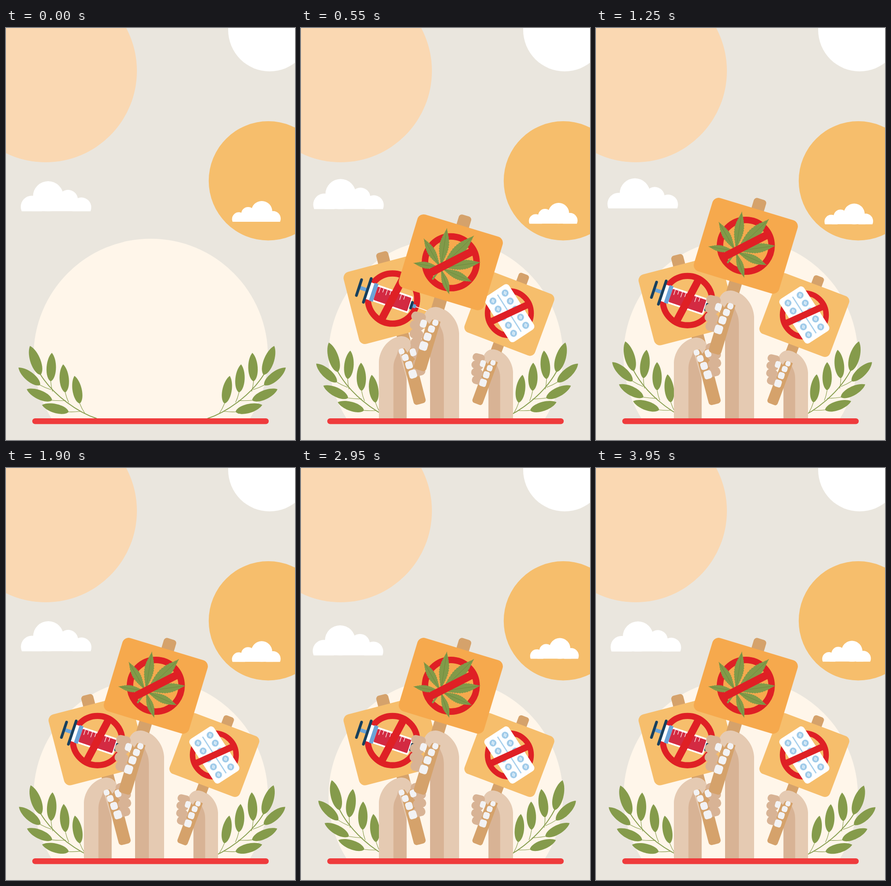
An HTML page for the animation above (4 s loop, 627x893 px).

```html
<!DOCTYPE html>
<html lang="en">
<head>
<meta charset="utf-8">
<title>Raised signs</title>
<style>
html, body { margin: 0; width: 100%; height: 100%; overflow: hidden; background: #eae6de; }
svg { display: block; width: 627px; height: 893px; }
</style>
</head>
<body>
<svg id="stage" viewBox="0 0 627 893" xmlns="http://www.w3.org/2000/svg"></svg>
<script>
const LOOP = 4000, STEP = 50, GROUND = 846;
const GREEN = '#859b4b', RED = '#df2025', SAND = '#f6be6c', WOOD = '#d5a26b';
const LIGHT = '#e5cab2', SKIN = '#d8b395', NAVY = '#17405e', BLUE = '#6ba4d8', PALE = '#a8d0ec';

const circle = (x, y, r, fill) => `<circle cx="${x}" cy="${y}" r="${r}" fill="${fill}"/>`;
const rect = (x, y, w, h, r, fill) =>
  `<rect x="${x}" y="${y}" width="${w}" height="${h}" rx="${r}" fill="${fill}"/>`;
const line = (x1, y1, x2, y2, color, w, cap = 'butt') =>
  `<path d="M${x1} ${y1}L${x2} ${y2}" stroke="${color}" stroke-width="${w}" stroke-linecap="${cap}"/>`;
const path = (d, fill) => `<path d="${d}" fill="${fill}"/>`;
const group = (transform, body, id) =>
  `<g ${id ? `id="${id}" ` : ''}transform="${transform}">${body}</g>`;
const at = (x, y, angle, body) => group(`translate(${x} ${y}) rotate(${angle})`, body);
// Rounded box placed by its centre
const box = (x, y, w, h, r, angle, fill) => at(x, y, angle, rect(-w / 2, -h / 2, w, h, r, fill));
const repeat = (n, make) => Array.from({ length: n }, (_, i) => make(i)).join('');

// Cloud with its lower left corner at the origin
const cloud = `<g clip-path="url(#flat)">` +
  circle(24, -9.8, 24, '#fff') + circle(59.5, -32.3, 33, '#fff') +
  circle(102.5, -25, 21.5, '#fff') + circle(131.5, -8.5, 21.5, '#fff') +
  rect(24, -26, 106, 26, 0, '#fff') + '</g>';

// Leaf from tip to base, with a curved stalk on to the stem
function leaf(tip, base, joint, bend) {
  const dx = base[0] - tip[0], dy = base[1] - tip[1], len = Math.hypot(dx, dy);
  const a = len * .24, b = len * .88, w = len * .22;
  const mid = [(base[0] + joint[0]) / 2 - bend, (base[1] + joint[1]) / 2 + bend];
  return `<path d="M${base}Q${mid} ${joint}" fill="none" stroke="${GREEN}" stroke-width="1.1"/>` +
    at(...tip, Math.atan2(dy, dx) * 180 / Math.PI,
      path(`M0 0C${a} ${w} ${b} ${w} ${len} 0C${b} ${-w} ${a} ${-w} 0 0Z`, GREEN));
}

const branch =
  `<path d="M197 846.500C158 834 104 798 74 750" fill="none" stroke="${GREEN}" stroke-width="1.9"/>` +
  repeat(3, i => leaf([148.5 - 24.5 * i, 754 - 25 * i], [160 - 31.5 * i, 814 - 24 * i],
    [171 - 35 * i, 835 - 23.5 * i], 1)) +
  repeat(3, i => leaf([78 - 40.5 * i + 7.5 * i * i, 817 - 27.5 * i - 6.5 * i * i],
    [136 - 41 * i + 5 * i * i, 832 - 21 * i - 4 * i * i], [161 - 31.5 * i, 831 - 23.5 * i], 1)) +
  leaf([52, 689], [75, 752], [75, 752], 0);

// Saw-edged leaflet growing along the x axis
function leaflet(len) {
  const teeth = 16, up = [], down = [];
  for (let i = 1; i < teeth * 2; i++) {
    const u = i / teeth / 2, tooth = i % 2 ? .8 : -.6;
    const half = len * .115 * Math.sin(Math.PI * u ** 1.15) ** 1.2 + tooth * Math.sin(Math.PI * u);
    up.push(`${u * len} ${half}`);
    down.unshift(`${u * len} ${-half}`);
  }
  return path(`M0 0L${up.join('L')}L${len} 0L${down.join('L')}Z`, '#819a49') +
    line(0, 0, len * .94, 0, '#6d883d', .9);
}

const plant = at(303, 484, 0, line(0, 0, -17, 24, '#819a49', 4, 'round') +
  [-170, -120, -81, -44, -8, 24, 72]
    .map((angle, i) => at(0, 0, angle, leaflet(101 - 13.5 * Math.abs(i - 3)))).join(''));

const syringe = at(144, 573, 18.5,
  rect(-19, -4, 22, 8, 0, BLUE) + line(-19, -17, -19, 18, NAVY, 6, 'round') +
  rect(0, -18.5, 99, 37.5, 3, '#fff') + rect(10, -20, 9, 40, 1, BLUE) +
  rect(19, -14.5, 77, 30, 2, '#d32a42') +
  repeat(8, i => line(25 + i * 8, -14.5, 25 + i * 8, i % 2 ? -6 : -2.5, '#fff', 1.2)) +
  line(0, -26, 0, 27, NAVY, 6, 'round') +
  line(109, 0, 150, 1, '#fff', 1.8) + rect(103, -4, 8, 8, 2, BLUE) + rect(98, -9, 6, 18, 2, NAVY));

const pill = circle(0, 0, 7.6, PALE) +
  `<circle r="5.300" fill="none" stroke="#8fbfe2" stroke-width=".8"/>` +
  at(0, 0, 45, line(-1.4, -4, -1.4, 3, '#fff', 1.3) + line(1.6, -3, 1.6, 4, '#fff', 1.3));
const pack = at(452, 622, -33,
  rect(-31.5, -57, 63, 114, 8, '#fff') + line(0, -47, 0, 47, PALE, 2.6) +
  repeat(10, i => at(i % 2 ? 15.7 : -15.7, ((i >> 1) - 2) * 20.5, 0, pill)));

const arm = path('M343 1000V626C342 600 322 572 293 569C280 568 270 577 267 588L280 640V1000Z', LIGHT) +
  path('M280 1000V664L299 598C302 618 310 618 310 642V1000Z', SKIN);
const grip =
  path('M267 589C270 577 280 568 293 569C312 571 326 586 326 602C318 616 308 612 303 601L285 596L278 606Z', LIGHT) +
  repeat(4, i => box(255 - 4.6 * i + 1.2 * i * i, 590 + 19 * i, 32 - i, 19.5 + i / 2, 9.5, 14, SKIN)) +
  repeat(4, i => box(291.5 - 8.5 * i, 603 + 12 * i + 1.6 * i * i, 13 + 1.6 * i, 13 + 2 * i, 5, 17, '#f2f2f4')) +
  box(265.5, 605, 14, 17, 5, 17, '#f2f2f4');

// One design at three sizes: hand set by its shoulder, sign by its centre
function sign({ id, size, hand, flip = 1, centre, tilt, color, face, bar }) {
  const held = body => group(`translate(${hand}) scale(${flip * size} ${size}) translate(-343 -569)`, body);
  const scaled = (angle, body) => group(`translate(${centre}) rotate(${angle}) scale(${size})`, body);
  return `<g id="${id}">` + held(arm) +
    scaled(tilt, rect(-12, -106.5, 28, 350, 7, WOOD)) + held(grip) +
    scaled(tilt, rect(-96.5, -83, 193, 166, 14, color)) +
    scaled(0, `<circle r="56" fill="none" stroke="${RED}" stroke-width="14"/>`) + face +
    scaled(bar, line(-60, 0, 60, 0, RED, 17)) + '</g>';
}

const signs =
  sign({ id: 'left', size: .955, hand: [169, 671], flip: -1, centre: [198.5, 590.8],
    tilt: -14.6, color: SAND, face: syringe, bar: -62 }) +
  sign({ id: 'right', size: .845, hand: [460, 699], centre: [452, 622],
    tilt: 20.6, color: SAND, face: pack, bar: -24.5 }) +
  sign({ id: 'middle', size: 1, hand: [343, 569], centre: [325, 472],
    tilt: 16.8, color: '#f6a94d', face: plant, bar: -27 });

const stage = document.getElementById('stage');
stage.innerHTML =
  `<defs><clipPath id="flat"><rect x="-5" y="-80" width="180" height="80"/></clipPath>
  <clipPath id="above"><rect width="627" height="${GROUND + 1}"/></clipPath></defs>` +
  rect(0, 0, 627, 893, 0, '#eae6de') + circle(86, 93, 198, '#fad8b2') +
  circle(572, 4, 90, '#fff') + circle(569, 331.3, 129.2, SAND) +
  group('', cloud, 'cloudA') + group('', cloud, 'cloudB') +
  `<g clip-path="url(#above)">` + circle(314, 711, 254.3, '#fff6ea') +
  group('', branch, 'branchA') + group('translate(634 0) scale(-1 1)', group('', branch, 'branchB')) +
  signs + '</g>' + rect(57, GROUND, 513, 12.5, 6.2, '#ef3b3c');

const move = (id, transform) => document.getElementById(id).setAttribute('transform', transform);

// Linear track with one value per second
function track(values, t) {
  const i = Math.floor(t / 1000), k = t / 1000 - i;
  return values[i] + (values[(i + 1) % values.length] - values[i]) * k;
}

// Rise from the ground, stretch past full height, settle
function rise(id, t, height) {
  const part = (from, to) => Math.min(1, Math.max(0, (t - from) / (to - from)));
  const s = 1 + .052 * (part(270, 350) - part(350, 650));
  move(id, `matrix(1 0 0 ${s} 0 ${GROUND * (1 - s) + (1 - part(0, 270)) * height})`);
}

function draw(t) {
  const ax = 32 + track([0, -10, 1.5, -7], t), ay = 397.3 + track([0, -8.7, 1, 9.3], t);
  const bx = 596 + track([0, 7.3, -1, 7], t), by = 420 + track([0, 7.5, -.5, -6.7], t);
  move('cloudA', `translate(${ax} ${ay})`);
  move('cloudB', `translate(${bx} ${by}) scale(-.69 .69)`);
  const sway = `rotate(${5.4 * (1 - Math.abs(1 - t / 1000 % 2))} 196 846)`;
  move('branchA', sway);
  move('branchB', sway);
  rise('left', t, 362);
  rise('right', t, 316);
  rise('middle', t - 300, 484);
}

const start = performance.now();
function tick() {
  const t = (performance.now() - start) % LOOP;
  draw(Math.floor(t / STEP) * STEP);
  requestAnimationFrame(tick);
}
tick();
</script>
</body>
</html>
```
